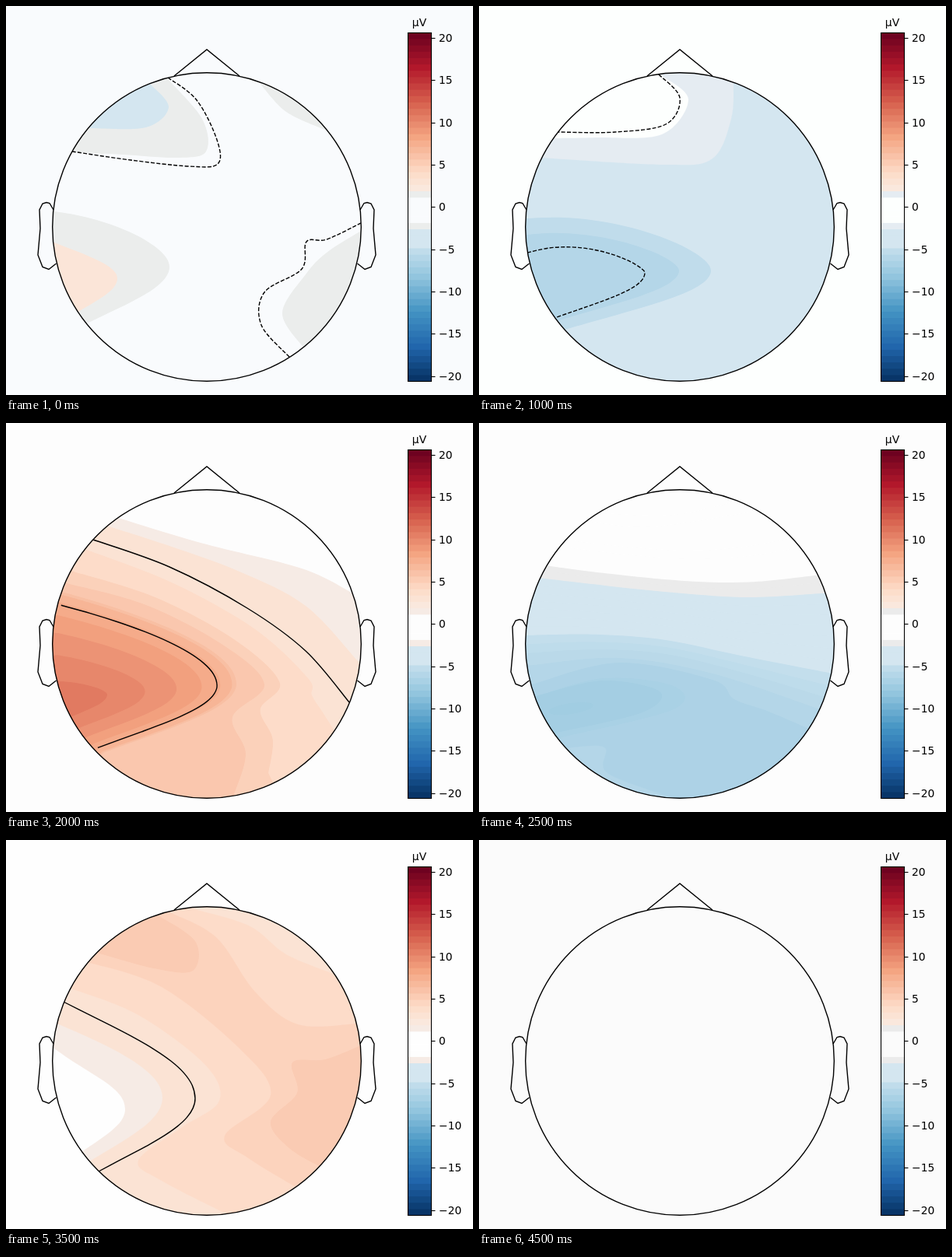
Animation of 600 by 500 pixels, one loop 5000 ms. Source, as an HTML page with a canvas:

```html
<!DOCTYPE html>
<html>
<head>
<meta charset="utf-8">
<style>
html, body { margin: 0; width: 100%; height: 100%; overflow: hidden; }
canvas { display: block; }
</style>
</head>
<body>
<canvas id="stage" width="600" height="500"></canvas>
<script>
const ctx = document.getElementById('stage').getContext('2d');
const CX = 258, CY = 284, R = 198.3, BAND = 8.15, MID = 258.5;
const RAMP = ['053061', '2166ac', '4393c3', '92c5de', 'd1e5f0', 'f7f7f7',
  'fddbc7', 'f4a582', 'd6604d', 'b2182b', '67001f'];
let paper, pale, gain;

const channels = hex => [0, 2, 4].map(i => parseInt(hex.slice(i, i + 2), 16));
const mix = (a, b, k) => a + (b - a) * k;

// Levels count colour bands away from zero (27 each way).
function color(level) {
  if (level > -2.5 && level < 2) return paper;
  if (level > -3.5 && level < 3) return pale;
  if (level > -6.5 && level < 0) return '#d4e6f0';
  const t = Math.min(9.999, Math.max(0, (0.5 + level / 55) * 10));
  const a = channels(RAMP[t | 0]), b = channels(RAMP[(t | 0) + 1]);
  return `rgb(${a.map((v, i) => Math.round(mix(v, b[i], t % 1)))})`;
}

const points = curve => typeof curve === 'string'
  ? curve.split(' ').map(p => p.split(',').map(Number)) : curve;

const blend = (a, b, k) => {
  const q = points(b);
  return points(a).map((p, i) => [mix(p[0], q[i][0], k), mix(p[1], q[i][1], k)]);
};

// A tongue leaves the rim, turns vertical at its tip and returns; bow sets its upper slope.
function tongue(curve, bow = 0.35) {
  const [start, tip, end] = points(curve);
  const arm = (from, slope) => {
    const dx = tip[0] - from[0], dy = tip[1] - from[1];
    const c = [from, [from[0] + dx / 2, from[1] + slope * dy], [tip[0], tip[1] - 0.37 * dy], tip];
    return Array.from({ length: 9 }, (_, i) => {
      const t = i / 8, s = 1 - t, w = [s * s * s, 3 * s * s * t, 3 * s * t * t, t * t * t];
      return [0, 1].map(axis => w.reduce((sum, f, j) => sum + f * c[j][axis], 0));
    });
  };
  return [...arm(start, bow), ...arm(end, 0.36).reverse().slice(1)];
}

function spline(p) {
  ctx.beginPath();
  ctx.moveTo(...p[0]);
  for (let i = 0; i < p.length - 1; i++) {
    const a = p[i - 1] || p[i], b = p[i], c = p[i + 1], d = p[i + 2] || c;
    ctx.bezierCurveTo(b[0] + (c[0] - a[0]) / 6, b[1] + (c[1] - a[1]) / 6,
      c[0] - (d[0] - b[0]) / 6, c[1] - (d[1] - b[1]) / 6, c[0], c[1]);
  }
}

function base(level) {
  ctx.fillStyle = color(level * gain);
  ctx.fillRect(CX - R, CY - R, 2 * R, 2 * R);
}

// Fills one side of a curve, closed clockwise along the head's rim.
function area(level, curve) {
  const p = points(curve), end = p[p.length - 1];
  spline(p);
  ctx.arc(CX, CY, R + 3, Math.atan2(end[1] - CY, end[0] - CX),
    Math.atan2(p[0][1] - CY, p[0][0] - CX));
  ctx.fillStyle = color(level * gain);
  ctx.fill();
}

function contour(curve, dashed = true) {
  if (gain < 1) return;
  spline(points(curve));
  ctx.setLineDash(dashed ? [5.1, 2.2] : []);
  ctx.stroke();
  ctx.setLineDash([]);
}

function quiet() {
  area(-3, '207,93 252,145 257,187 220,195 150,191 88,188');
  area(-5, '185,100 209,130 180,156 108,157');
  area(-3, '412,160 360,136 325,98');
  area(2.5, tongue('62,264 210,335 104,408', 0.12));
  area(3.5, tongue('62,304 143,350 93,393'));
  area(-3, '383,440 355,395 385,345 412,317 456,289');
  contour('208,92 245,121 271,172 272,203 235,206 160,198 85,187');
  contour('364,451 328,410 332,368 380,338 386,303 412,300 456,279');
}

function cool() {
  base(-5);
  area(-3, '327,99 324,145 300,196 240,204 78,195');
  area(0, '234,89 269,120 235,165 150,169 95,170');
  area(-7, tongue('60,273 298,340 110,416', -0.16));
  area(-8, tongue('60,294 257,340 103,404', -0.26));
  contour('231,88 258,118 240,152 175,162 102,162');
  contour(tongue('62,317 213,343 97,401', -0.9));
}

function fading() {
  area(-3, tongue('64,320 209,344 98,400', -0.84));
  area(-3, '415,166 385,153 358,114');
  contour(tongue('60,299 263,338 105,410', -0.55));
  contour('436,197 400,197 364,162 332,99');
}

function hot() {
  const slope = '104,163 215,206 320,265 388,328 393,350 407,372 421,394';
  const notch = '78,206 180,234 280,286 332,336 291,378 308,425 292,480';
  const outer = tongue('72,217 296,335 125,424', 0.26);
  const inner = tongue('64,332 130,349 78,380', 0);
  area(2.5, '135,119 250,154 380,187 446,219');
  area(4, '126,131 210,158 300,191 385,235 452,306');
  area(5.3, slope);
  area(6.5, blend(slope, notch, 0.65));
  area(7.5, notch);
  for (let i = 0; i <= 6; i++) area(8.4 + i, blend(outer, inner, (i / 6) ** 1.9));
  contour('112,150 210,185 310,238 385,293 441,359', false);
  contour(blend(outer, inner, 0.15), false);
}

function cold() {
  const first = '116,148 175,155 260,161 330,157 400,144';
  const upper = '84,190 170,201 260,210 350,213 440,205';
  const middle = '66,238 150,243 240,252 340,268 456,274';
  const lower = '60,296 150,291 240,297 340,321 443,352';
  base(4);
  area(2.5, '155,116 250,118 336,99');
  area(0, '135,126 225,133 362,112');
  area(-3, blend(first, upper, 0.06));
  area(-5, blend(first, upper, 0.27));
  area(-7, blend(first, upper, 0.85));
  for (let i = 0; i < 5; i++) area(-8.2 - i * 1.1, blend(upper, middle, i / 5));
  for (let i = 0; i <= 5; i++) area(-13.8 - i, blend(middle, lower, i / 5));
  area(-20, '62,312 180,302 300,322 438,368');
  area(-21.7, '68,336 180,308 300,330 328,355 370,370 424,393');
  area(-20, '112,418 161,417 165,450 250,482');
  area(-22.5, '72,352 160,328 250,338 250,368 106,404');
  area(-23.5, '76,350 160,331 232,345 210,372 100,398');
  ctx.beginPath();
  ctx.ellipse(118, 367, 29, 7, -0.15, 0, 7);
  ctx.fillStyle = color(-24.2 * gain);
  ctx.fill();
  contour('171,105 200,105 230,101 258,94 298,89', false);
  [first, upper, middle, lower].forEach(c => contour(c));
}

function warm() {
  base(6.3);
  area(5.3, '451,236 375,237 320,195 270,125 208,92');
  area(4, '421,172 360,147 312,110 238,88');
  area(5.3, '105,157 200,189 300,268 340,328 281,380 310,408 372,446');
  area(4, '84,191 170,225 255,288 274,335 225,370 170,412 200,438 282,480');
  area(2.5, tongue('68,237 201,331 106,414', 0.3));
  area(0, tongue('62,268 153,346 97,401', 0.44));
  area(7.1, '192,95 243,130 240,168 190,165 117,145');
  area(7.1, '410,423 365,397 340,362 374,325 368,286 410,282 456,264');
  contour(tongue('74,208 243,332 119,426'), false);
}

function polyline(curve, mirrored) {
  ctx.beginPath();
  points(curve).forEach(([x, y]) => ctx.lineTo(mirrored ? 2 * CX - x : x, y));
  ctx.stroke();
}

function headOutline() {
  const ear = '61,262 56,253.5 52,252.5 47,254 43,262 44,286 41,320 47,335.5 55,338.5 64.5,331';
  ctx.lineWidth = 1.4;
  ctx.beginPath();
  ctx.arc(CX, CY, R, 0, 7);
  ctx.stroke();
  polyline('216,90 258,56 300,90');
  polyline(ear);
  polyline(ear, true);
}

function colorBar() {
  const top = MID - 27.5 * BAND;
  for (let level = 27; level >= -27; level--) {
    const y = top + (27 - level) * BAND;
    ctx.fillStyle = color(level);
    ctx.fillRect(516.5, y, 30, 482.5 - y);
  }
  ctx.lineWidth = 1.1;
  ctx.strokeRect(516.5, 34.5, 30, 448);
  ctx.fillStyle = '#000';
  ctx.font = '13.9px "DejaVu Sans", sans-serif';
  ctx.textAlign = 'center';
  ctx.fillText('µV', 531, 26);
  ctx.textAlign = 'left';
  for (let v = -20; v <= 20; v += 5) {
    const y = Math.round(MID - 0.15 - v * 10.875);
    polyline([[546.5, y + 0.5], [551.5, y + 0.5]]);
    ctx.fillText(String(v).replace('-', '−'), 556, y + 5);
  }
}

// Each scene: drawing, background, near-zero tint, strength.
const scenes = [
  [quiet, '#f9fbfd', '#ebedec'],
  [cool, '#f9fbfd', '#e5ecf0', 0.6],
  [cool, '#fdfffe', '#e5ecf2'],
  [fading, '#f9fafc', '#e5edf0'],
  [hot, '#fdfdfd', '#f6ebe5'],
  [cold, '#fdfdfd', '#ebebeb', 0.4],
  [cold, '#fefefe', '#ebebeb'],
  [warm, '#fefefe', '#f6ebe5'],
  [warm, '#fefefe', '#f6ebe5', 0.6],
  [() => {}, '#fbfbfb', '#ebebeb']
];

function draw([paint, background, tint, strength = 1]) {
  paper = background;
  pale = tint;
  gain = strength;
  ctx.fillStyle = paper;
  ctx.fillRect(0, 0, 600, 500);
  ctx.strokeStyle = '#000';
  ctx.lineWidth = 1.4;
  ctx.save();
  ctx.beginPath();
  ctx.arc(CX, CY, R, 0, 7);
  ctx.clip();
  paint();
  ctx.restore();
  headOutline();
  colorBar();
}

let shown = -1;
const start = performance.now();
function tick() {
  const index = Math.floor((performance.now() - start) / 500) % scenes.length;
  if (index !== shown) draw(scenes[shown = index]);
  requestAnimationFrame(tick);
}
tick();
</script>
</body>
</html>
```
